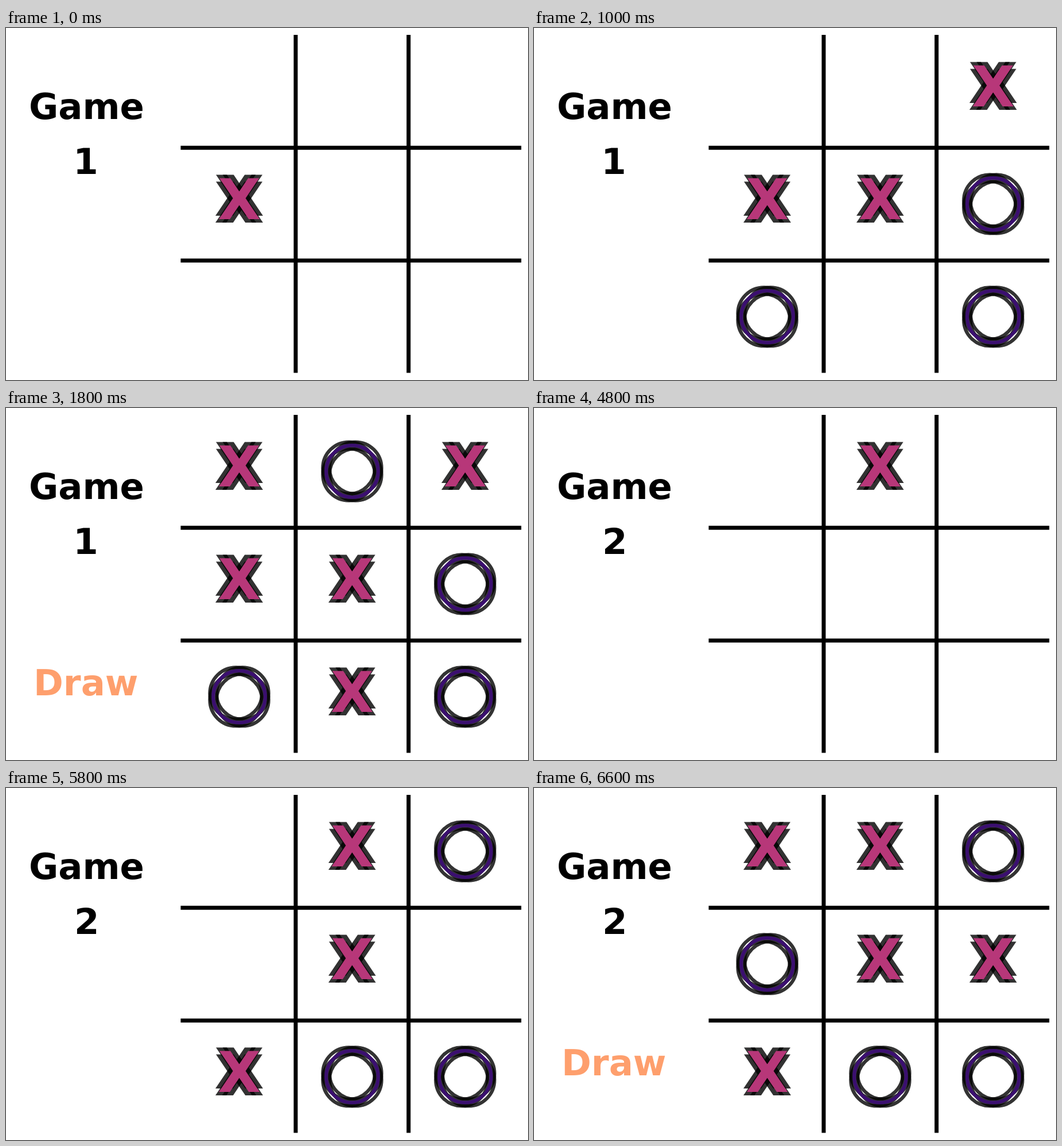
These frames come from a looping animation (910x615 px, 8 s). An HTML page:

```html
<!DOCTYPE html>
<html lang="en">
<head>
<meta charset="utf-8">
<title>Noughts and crosses</title>
<style>
html, body { margin: 0; width: 100%; height: 100%; overflow: hidden; background: #fff; }
svg { display: block; width: 910px; height: 615px; }
text { font-family: "DejaVu Sans", sans-serif; font-weight: bold; font-size: 62.5px; text-anchor: middle; }
.x { font-size: 97.2px; }
.o { fill: none; stroke-width: 6; }
</style>
</head>
<body>
<svg viewBox="0 0 910 615">
  <defs>
    <text id="X" class="x" x="0" y="26.3">X</text>
    <circle id="O" class="o" r="45.4"/>
  </defs>
  <path d="M505 12V602.5M701.8 12V602.5M304.5 209.3H898.3M304.5 406.2H898.3" stroke="#000" stroke-width="7"/>
  <text x="140.5" y="158.5">Game</text>
  <text id="num" y="255"></text>
  <text id="result" x="139.3" y="501.7" fill="#fe9f6d">Draw</text>
  <g id="marks"></g>
</svg>
<script>
const LOOP = 8000, STEP = 200, CELL = 196.9, SHIFT = 5.8;
const COLORS = { X: '#b73779', O: '#3b0f70' };
// Moves are cell indices, row by row; X goes first.
const games = [
  { start: 0, label: '1', x: 139, moves: [3, 5, 4, 8, 2, 6, 7, 1, 0] },
  { start: 4800, label: '2', x: 140.8, moves: [1, 7, 4, 8, 6, 2, 5, 3, 0] }
];
const byId = id => document.getElementById(id);
const num = byId('num'), result = byId('result'), marks = byId('marks');

function add(parent, tag, attrs) {
  const el = document.createElementNS('http://www.w3.org/2000/svg', tag);
  for (const key in attrs) el.setAttribute(key, attrs[key]);
  return parent.appendChild(el);
}

function addMark(game, cell, turn) {
  const kind = turn % 2 ? 'O' : 'X';
  const x = 406.6 + CELL * (cell % 3), y = 307.5 + CELL * (Math.floor(cell / 3) - 1);
  const group = add(marks, 'g', { transform: `translate(${x} ${y})` });
  const layer = (dx, dy, color, opacity) => add(group, 'use', {
    href: '#' + kind, x: dx, y: dy, opacity,
    [kind === 'X' ? 'fill' : 'stroke']: color
  });
  for (const dx of [-SHIFT, SHIFT])
    for (const dy of [-SHIFT, SHIFT]) layer(dx, dy, '#000', 0.8);
  layer(0, 0, COLORS[kind], 1);
  return { group, game, time: game.start + turn * STEP };
}

const placed = games.flatMap(game => game.moves.map((cell, turn) => addMark(game, cell, turn)));
const show = (el, on) => el.setAttribute('visibility', on ? 'visible' : 'hidden');

function draw(t) {
  const game = t < games[1].start ? games[0] : games[1];
  num.textContent = game.label;
  num.setAttribute('x', game.x);
  show(result, t >= game.start + game.moves.length * STEP);
  for (const m of placed) show(m.group, m.game === game && t >= m.time);
}

const begin = performance.now();
function tick() {
  draw((performance.now() - begin) % LOOP);
  requestAnimationFrame(tick);
}
draw(0);
requestAnimationFrame(tick);
</script>
</body>
</html>
```
